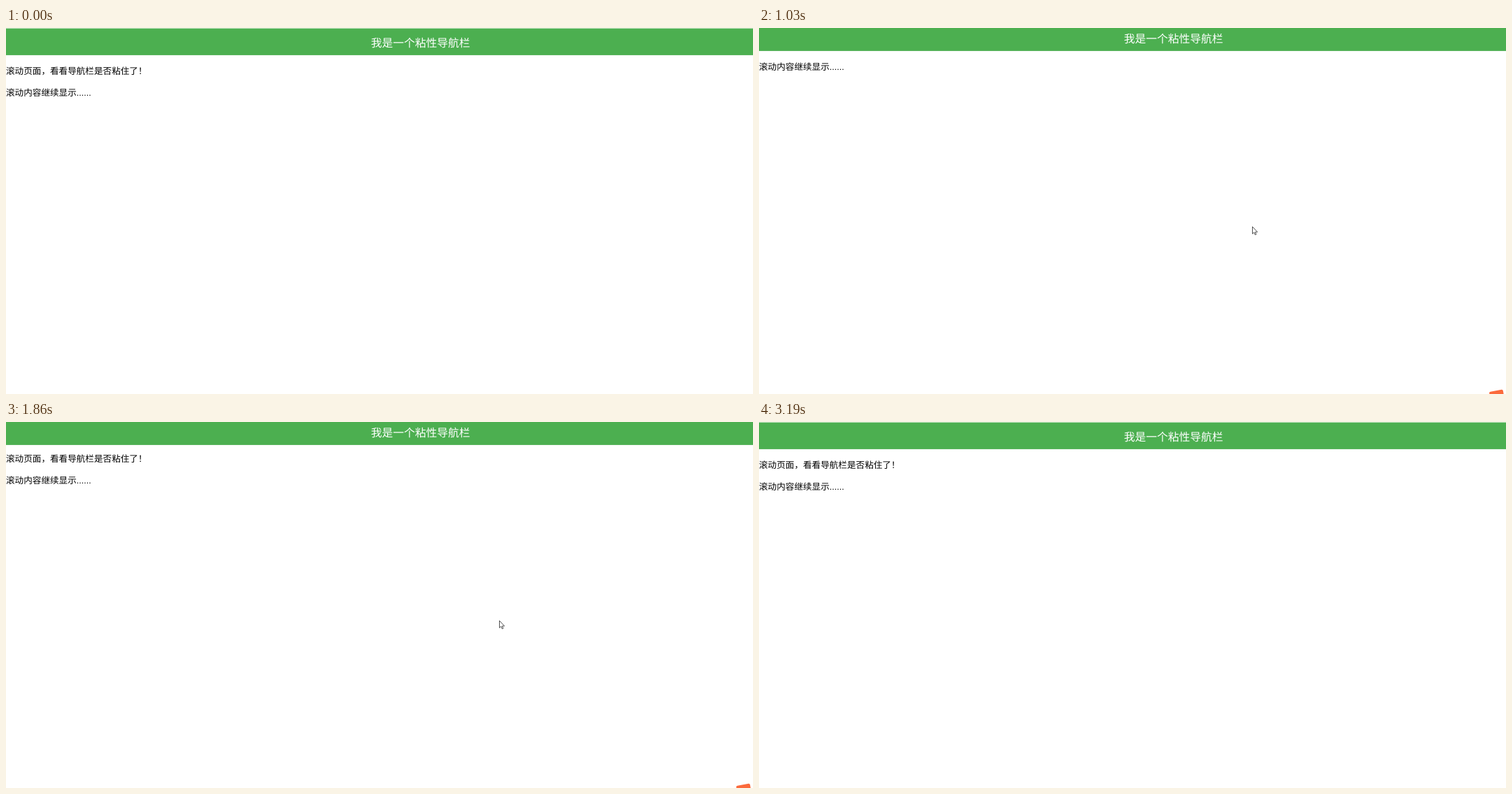
Recreate the animation shown at these times as an HTML page. Size 1068 px wide and 524 px high, loop 3.26 s.

```html
<!DOCTYPE html>
<html lang="zh-CN">
<head>
<meta charset="utf-8">
<title>粘性导航栏</title>
<style>
  html, body { margin: 0; width: 100%; height: 100%; overflow: hidden; background: #fff; }
  svg { display: block; width: 1068px; height: 524px; }
  text {
    font-family: "Liberation Sans", "Noto Sans CJK SC", "Noto Sans CJK", sans-serif;
    text-rendering: geometricPrecision;
  }
  #page { font-size: 12.6px; fill: #000; }
  #nav text { font-size: 15.75px; fill: #fff; }
</style>
</head>
<body>
<svg viewBox="0 0 1068 524" lang="zh-CN">
  <g id="page">
    <text x="0" y="66">滚动页面，看看导航栏是否粘住了！</text>
    <text x="0" y="96.7">滚动内容继续显示......</text>
  </g>
  <g id="nav">
    <rect y="0.6" width="1068" height="38.3" fill="#4caf50"/>
    <text x="521.8" y="27">我是一个粘性导航栏</text>
  </g>
  <rect id="badge" width="20" height="20" rx="2" fill="#fb6a3c" transform="translate(1043.8 521) rotate(-10)"/>
  <path id="cursor" d="M.5 .5V10.7L2.8 8.6L4.3 12.1L5.9 11.4L4.4 8.1H7.6Z" fill="#fff" stroke="#333" stroke-width=".85"/>
</svg>
<script>
  const LOOP = 3260;
  const TICK = 67;           // screen refresh while scrolling
  const NOTCH = 79;          // distance of one wheel turn
  const SCROLL_TIME = 165;
  const STUCK = 6;           // the bar sticks after this much scrolling
  const REST = { x: 705, y: 284 };
  const EDGE = { x: 1017, y: 520 };
  const ENTER = { from: 70, to: 510 };
  const LEAVE = { from: 2070, to: 2470 };
  const GLIDE_STEPS = 6;

  // Wheel turns: first visible moment, time already run by then, direction
  const turns = [
    { at: 700, lead: 24, dir: 1 },
    { at: 1030, lead: 87, dir: -1 },
    { at: 1520, lead: 24, dir: 1 },
    { at: 1790, lead: 63, dir: -1 }
  ];

  const el = id => document.getElementById(id);
  const page = el("page"), nav = el("nav"), badge = el("badge"), cursor = el("cursor");

  const smooth = p => p * p * (3 - 2 * p);
  const easeOut = p => 1 - (1 - p) ** 2;
  const move = (node, x, y) => node.setAttribute("transform", `translate(${x} ${y})`);
  const show = (node, on) => node.setAttribute("visibility", on ? "visible" : "hidden");
  const mix = (a, b, u) => Math.round(a + (b - a) * u);

  function turned({ at, lead, dir }, t) {
    if (t < at) return 0;
    const elapsed = lead + Math.floor((t - at) / TICK) * TICK;
    return dir * NOTCH * smooth(Math.min(1, elapsed / SCROLL_TIME));
  }

  const glideStep = ({ from, to }, t) =>
    Math.min(GLIDE_STEPS, Math.floor((t - from) / (to - from) * GLIDE_STEPS));

  // 0 at rest, 1 at the edge of the stage
  function cursorOffset(t) {
    if (t < LEAVE.from) return 1 - easeOut(glideStep(ENTER, t) / GLIDE_STEPS);
    return easeOut((glideStep(LEAVE, t) + 1) / (GLIDE_STEPS + 1));
  }

  function draw(t) {
    const scroll = turns.reduce((sum, turn) => sum + turned(turn, t), 0);
    move(page, 0, -scroll);
    move(nav, 0, -Math.min(scroll, STUCK));

    const u = cursorOffset(t);
    move(cursor, mix(REST.x, EDGE.x, u), mix(REST.y, EDGE.y, u));
    show(cursor, t >= ENTER.from && t < LEAVE.to);
    show(badge, t >= ENTER.from && t < 3190);
  }

  const start = performance.now();
  function tick() {
    draw((performance.now() - start) % LOOP);
    requestAnimationFrame(tick);
  }
  tick();
</script>
</body>
</html>
```
